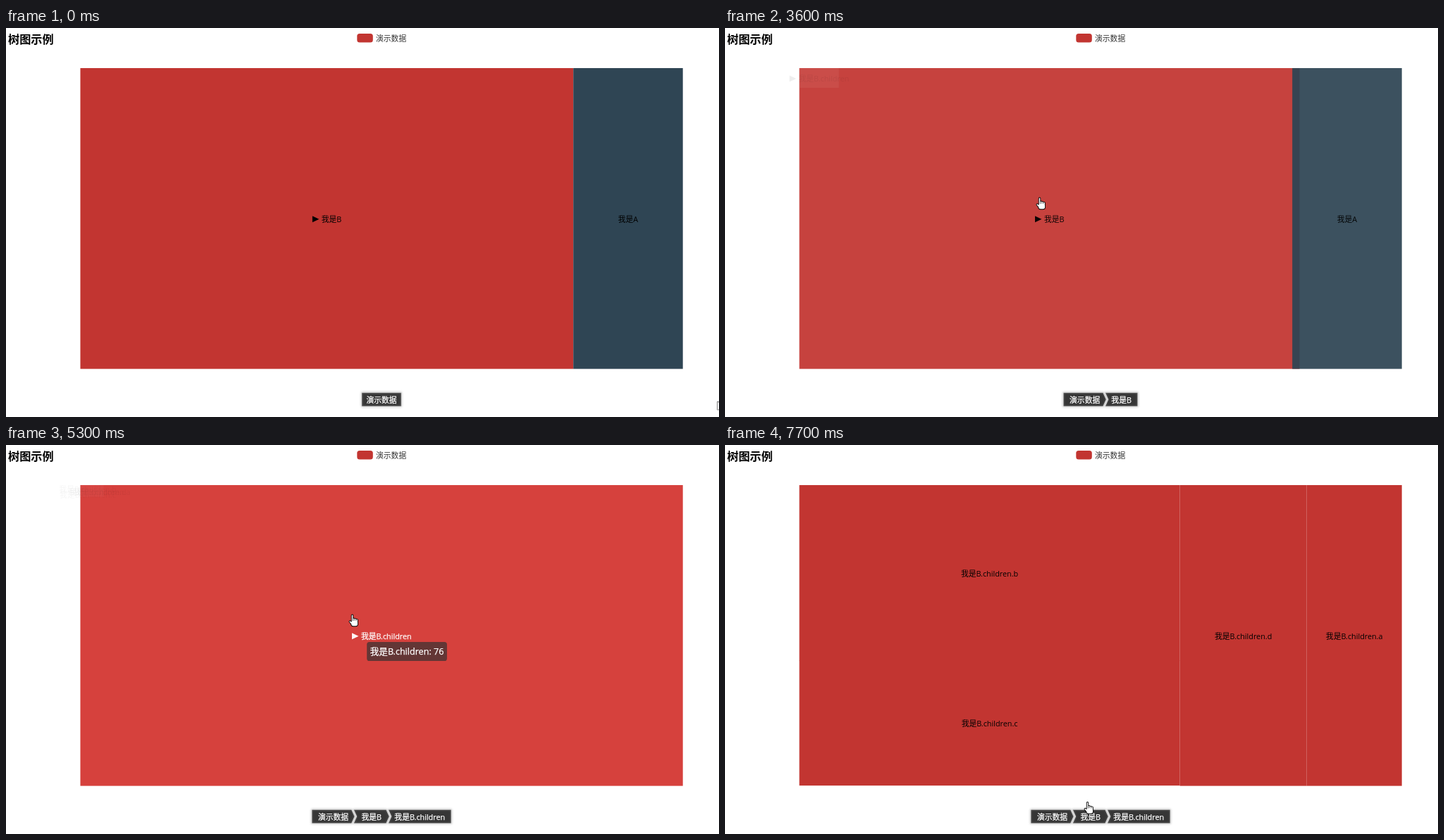
Recreate the animation shown at these times as an HTML page with a canvas. Size 1012x553 px, loop 8 s.

```html
<!DOCTYPE html>
<html lang="zh">
<head>
<meta charset="utf-8">
<title>树图示例</title>
<style>
  html, body { margin: 0; width: 100%; height: 100%; overflow: hidden; background: #fff; }
  canvas { display: block; width: 1012px; height: 553px; }
</style>
</head>
<body>
<canvas id="stage" width="1012" height="553"></canvas>
<script>
const ctx = document.getElementById('stage').getContext('2d');
const FONT = '"Open Sans", "Noto Sans CJK SC", "Noto Sans CJK", sans-serif';
const CHART = { x: 105.5, y: 57, w: 855.2, h: 427.6 };
const RED = [194, 53, 49], NAVY = [47, 69, 84];
const SMALL = 10.8;
const MOUSE_DROP = 19; // the pointer is drawn this far above the true mouse
const DRILL_1 = 3300, DRILL_2 = 5030, DRILL_TIME = 900;

const node = (suffix, value, color = RED, parent = false) =>
  ({ name: '我是' + suffix, value, color, parent });
const leaf = (suffix, value) => node('B.children.' + suffix, value);

// A level is a row of columns; every area is proportional to its value.
function layout(columns) {
  const sum = nodes => nodes.reduce((total, n) => total + n.value, 0);
  const total = sum(columns.flat());
  let x = 0;
  for (const column of columns) {
    const w = sum(column) / total;
    let y = 0;
    for (const n of column) {
      const h = n.value / sum(column);
      Object.assign(n, { x, y, w, h });
      y += h;
    }
    x += w;
  }
  return columns.flat();
}

const TOP = layout([[node('B', 180, RED, true)], [node('A', 40, NAVY)]]);
const MIDDLE = layout([[node('B.children', 76, RED, true)]]);
const LEAVES = layout([[leaf('b', 28), leaf('c', 20)], [leaf('d', 16)], [leaf('a', 12)]]);

// Mouse moves: start, end, and the point reached.
const MOVES = [
  [0, 0, 1010, 531], [800, 2300, 478.5, 327], [2800, 3200, 446.5, 241.5],
  [4600, 4900, 491.5, 241.5], [5900, 6200, 735, 412], [6200, 7300, 625, 425],
  [7300, 7700, 514.5, 508]
];

const clamp = p => Math.min(1, Math.max(0, p));
const quinticOut = p => 1 - (1 - p) ** 5;
const quinticInOut = p => p < 0.5 ? 16 * p ** 5 : 1 - 16 * (1 - p) ** 5;
const drill = (t, start) => quinticInOut(clamp((t - start) / DRILL_TIME));

function mouseAt(t) {
  let [, , x, y] = MOVES[0];
  for (const [start, end, toX, toY] of MOVES.slice(1)) {
    const p = quinticOut(clamp((t - start) / (end - start)));
    x += (toX - x) * p;
    y += (toY - y) * p;
  }
  return [x, y];
}

// A level reacts to the mouse only once the mouse has moved over it.
function hoveredNode(t, [x, y]) {
  const level = t < DRILL_1 ? TOP : t <= 4600 ? [] : t <= 5900 ? MIDDLE : LEAVES;
  const fx = (x - CHART.x) / CHART.w, fy = (y + MOUSE_DROP - CHART.y) / CHART.h;
  return level.find(n => fx >= n.x && fx < n.x + n.w && fy >= n.y && fy < n.y + n.h);
}

function setFont(size, weight = 'normal') {
  ctx.font = `${weight} ${size}px ${FONT}`;
}

function text(str, x, baseline, color, size = SMALL, weight) {
  setFont(size, weight);
  ctx.fillStyle = color;
  ctx.fillText(str, x, baseline);
  if (color === '#fff') {
    ctx.strokeStyle = color;
    ctx.lineWidth = 0.25;
    ctx.strokeText(str, x, baseline);
  }
}

function polygon(points) {
  ctx.beginPath();
  points.forEach(([x, y]) => ctx.lineTo(x, y));
  ctx.closePath();
}

function roundBox(x, y, w, h, color) {
  ctx.beginPath();
  ctx.roundRect(x, y, w, h, 3.6);
  ctx.fillStyle = color;
  ctx.fill();
}

function label(n, cx, cy, color) {
  setFont(SMALL);
  const indent = n.parent ? 13.4 : 0;
  const left = cx - (ctx.measureText(n.name).width + indent) / 2;
  text(n.name, left + indent, cy + 5.3, color);
  if (n.parent) {
    polygon([[left + 0.5, cy - 3.5], [left + 10, cy + 1], [left + 0.5, cy + 5.5]]);
    ctx.fill();
  }
}

// grow scales the tile out of the chart's corner, widen stretches it to the full width.
function tile(n, lit, alpha, grow = 1, widen = 0) {
  const x = CHART.x + n.x * CHART.w * grow;
  const w = (n.w + (1 - n.w) * widen) * CHART.w * grow;
  const y = CHART.y + Math.round(n.y * CHART.h) * grow, h = n.h * CHART.h * grow;
  ctx.globalAlpha = alpha;
  if (grow < 1) {
    ctx.fillStyle = '#fff';
    ctx.fillRect(x, y, w, h);
  }
  ctx.fillStyle = `rgb(${n.color.map(v => Math.round(lit ? v * 1.1 : v))})`;
  ctx.fillRect(x, y, w, h);
  label(n, x + w / 2, y + h / 2, lit ? '#fff' : '#000');
  ctx.globalAlpha = 1;
}

function treemap(t, hovered) {
  const first = drill(t, DRILL_1), second = drill(t, DRILL_2);
  if (first < 1) TOP.forEach(n => tile(n, n === hovered, 1 - first, 1, n.parent ? first : 0));
  if (first > 0 && second < 1) {
    MIDDLE.forEach(n => tile(n, n === hovered, first * (1 - second), first));
  }
  if (second > 0) LEAVES.forEach(n => tile(n, n === hovered, second, second));
}

function breadcrumb(names) {
  const gap = 7.2, arrow = 4.5, padding = 13.4;
  const top = 518.2, middle = 528.1, bottom = 538;
  setFont(SMALL);
  const widths = names.map(name => ctx.measureText(name).width + padding);
  let x = 533 - widths.reduce((sum, w) => sum + w + gap, -gap) / 2;
  names.forEach((name, i) => {
    const w = widths[i];
    const left = i === 0 ? x : x - arrow;
    const tip = i === names.length - 1 ? x + w : x + w + arrow;
    polygon([[left, top], [x + w, top], [tip, middle], [x + w, bottom], [left, bottom], [x, middle]]);
    ctx.save();
    ctx.shadowColor = 'rgb(150,150,150)';
    ctx.shadowBlur = 3;
    ctx.fillStyle = 'rgba(0,0,0,.7)';
    ctx.strokeStyle = 'rgba(255,255,255,.7)';
    ctx.lineWidth = 0.9;
    ctx.fill();
    ctx.stroke();
    ctx.restore();
    text(name, (left + tip - w + padding) / 2, 533, '#fff');
    x += w + gap;
  });
}

// The box trails slightly behind the mouse.
function tooltip(n, t) {
  const [x0, y0] = mouseAt(t), [x1, y1] = mouseAt(t - 100);
  const x = (x0 + x1) / 2 + 20.7, y = (y0 + y1) / 2 + 38.5;
  const str = `${n.name}: ${n.value}`;
  setFont(12.6);
  roundBox(x, y, ctx.measureText(str).width + 9, 27, 'rgba(50,50,50,.7)');
  text(str, x + 4.5, y + 18.3, '#fff', 12.6);
}

function handPath() {
  ctx.beginPath();
  for (let finger = 0; finger < 4; finger++) {
    ctx.moveTo(finger * 2.2, finger ? 5 + finger * 0.7 : 0.8);
    ctx.lineTo(finger * 2.2, 10);
  }
  ctx.moveTo(-3.2, 9.6); // thumb
  ctx.lineTo(0, 13);
  ctx.roundRect(-0.6, 9, 7.4, 6, 2);
}

function pointer(x, y) {
  const trueY = y + MOUSE_DROP;
  const onChart = x > CHART.x && x < CHART.x + CHART.w && trueY < CHART.y + CHART.h;
  const onCrumb = x < 633 && trueY > 518;
  ctx.save();
  ctx.translate(x, y);
  ctx.lineCap = ctx.lineJoin = 'round';
  if (onChart || onCrumb) handPath();
  else polygon([[0, 0], [0, 12], [8.5, 8.5]]);
  for (const [color, width] of onChart || onCrumb ? [['#000', 3.4], ['#fff', 1.6]] : [['#000', 1]]) {
    ctx.strokeStyle = color;
    ctx.lineWidth = width;
    ctx.stroke();
  }
  ctx.fillStyle = '#fff';
  ctx.fill();
  ctx.restore();
}

function draw(t) {
  const mouse = mouseAt(t), hovered = hoveredNode(t, mouse);
  ctx.fillStyle = '#fff';
  ctx.fillRect(0, 0, 1012, 553);
  text('树图示例', 3, 22.2, '#000', 16.2, 'bold');
  roundBox(498.3, 8, 22.5, 12.6, `rgb(${RED})`);
  text('演示数据', 525, 18.5, '#333');
  treemap(t, hovered);
  const depth = t < DRILL_1 ? 1 : t < DRILL_2 ? 2 : 3;
  breadcrumb(['演示数据', '我是B', '我是B.children'].slice(0, depth));
  if (hovered) tooltip(hovered, t);
  pointer(...mouse);
}

const start = performance.now();
function tick() {
  const elapsed = (performance.now() - start) % 8000;
  draw(Math.floor(elapsed / 100) * 100); // ten pictures a second
  requestAnimationFrame(tick);
}
tick();
</script>
</body>
</html>
```
